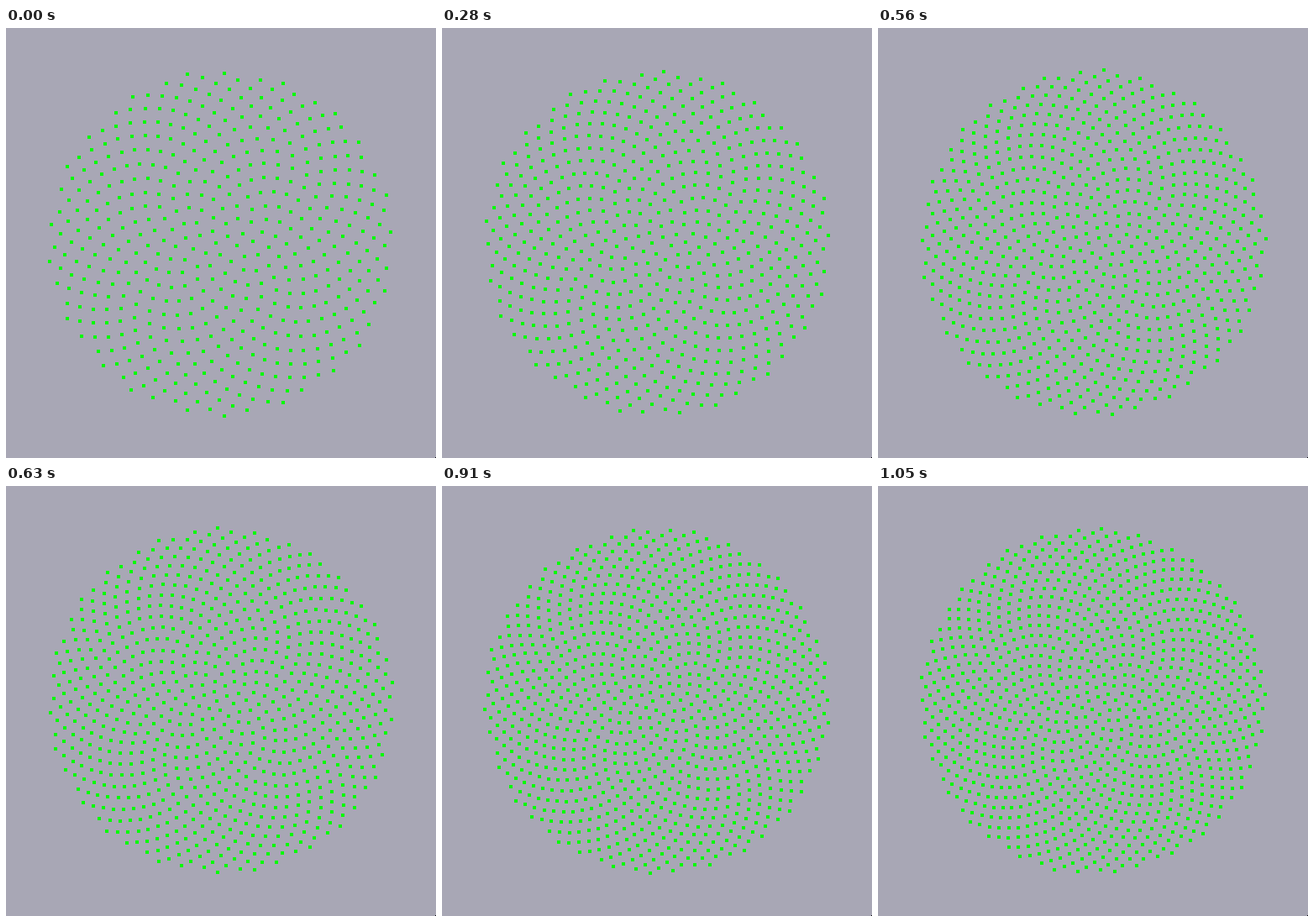
Write an HTML page that moves like this. It is 512x512 px and loops after 1120 ms.

```html
<!DOCTYPE html>
<html lang="en">
<head>
<meta charset="utf-8">
<title>Sunflower dots</title>
<style>
  html, body { margin: 0; width: 100%; height: 100%; overflow: hidden; background: #a8a7b5; }
  svg { display: block; width: 512px; height: 512px; }
</style>
</head>
<body>
<svg viewBox="0 0 512 512" shape-rendering="crispEdges">
  <rect width="512" height="512" fill="#a8a7b5"/>
  <path id="dots" fill="#00ff00"/>
  <rect x="511" y="511" width="1" height="1" fill="#000"/>
</svg>
<script>
  const STEP_MS = 70;
  const CENTER = 256;
  const RADIUS = 206;
  const DOT = 4;
  const GOLDEN_ANGLE = Math.PI * (3 - Math.sqrt(5));
  // Number of seeds filling the disc at each step
  const COUNTS = [503, 537, 572, 607, 641, 673, 704, 739,
                  774, 809, 843, 877, 909, 941, 977, 1012];

  const dots = document.getElementById('dots');

  function sunflower(count) {
    let d = '';
    for (let i = 0; i < count; i++) {
      const r = RADIUS * Math.sqrt((i + 0.5) / count);
      const angle = i * GOLDEN_ANGLE + Math.PI;
      const x = Math.round(CENTER + r * Math.cos(angle)) - DOT / 2;
      const y = Math.round(CENTER + r * Math.sin(angle)) - DOT / 2;
      d += `M${x} ${y}h${DOT}v${DOT}h${-DOT}z`;
    }
    return d;
  }

  const shapes = COUNTS.map(sunflower);
  let shown = -1;

  function render(time) {
    const step = Math.floor(time / STEP_MS) % shapes.length;
    if (step !== shown) {
      dots.setAttribute('d', shapes[step]);
      shown = step;
    }
  }

  const start = performance.now();
  function tick() {
    render(performance.now() - start);
    requestAnimationFrame(tick);
  }
  tick();
</script>
</body>
</html>
```
